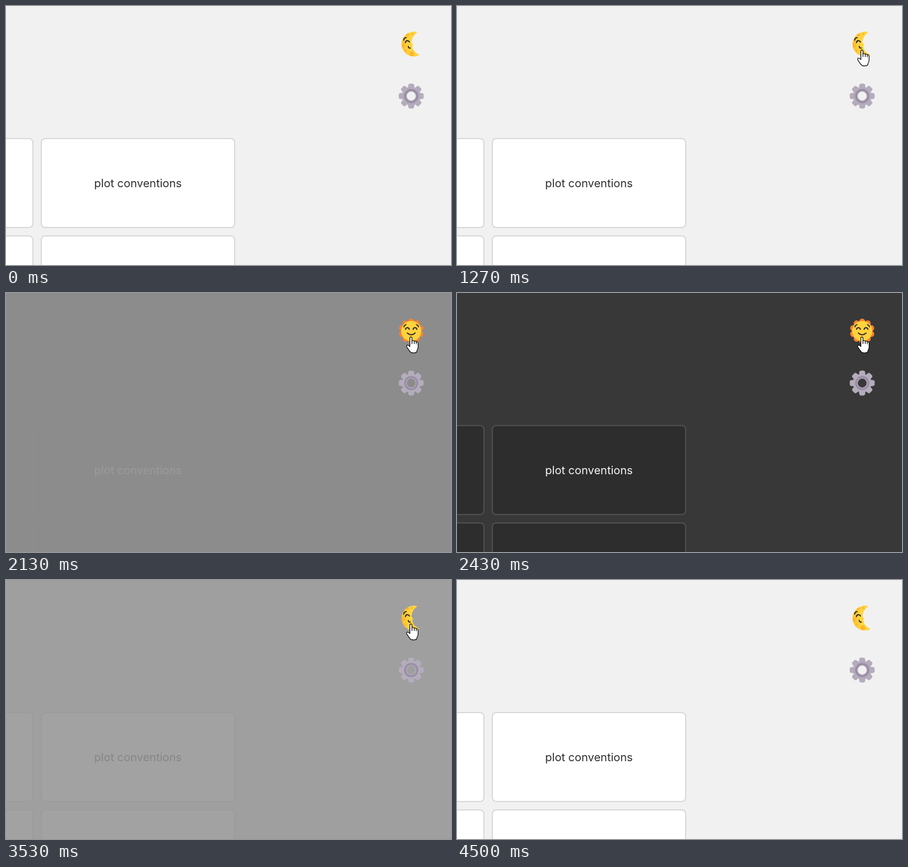
Recreate the animation shown at these times as an HTML page. Size 794 px wide and 463 px high, loop 5.83 s.

```html
<!DOCTYPE html>
<html lang="en">
<head>
<meta charset="utf-8">
<title>Theme toggle</title>
<style>
html, body { margin: 0; width: 100%; height: 100%; overflow: hidden; }
svg { display: block; width: 100vw; height: 100vh; }
text { font: 20px Inter, sans-serif; text-anchor: middle; }
.line { fill: none; stroke: #2b2433; stroke-width: 2; stroke-linecap: round; stroke-linejoin: round; }
</style>
</head>
<body>
<svg viewBox="0 0 794 463">
  <defs>
    <linearGradient id="glow" x1="0" x2="1">
      <stop offset="0" stop-color="#ffc22f"/>
      <stop offset=".5" stop-color="#fdd53f"/>
    </linearGradient>
    <clipPath id="crescent"><use href="#moonShape"/></clipPath>
  </defs>
  <rect id="page" width="794" height="463"/>
  <g id="cards" stroke-width="2">
    <rect x="-298" y="237" width="346" height="159" rx="7"/>
    <rect x="63" y="237" width="345" height="159" rx="7"/>
    <rect x="-298" y="411" width="346" height="159" rx="7"/>
    <rect x="63" y="411" width="345" height="159" rx="7"/>
  </g>
  <text id="label" x="235.5" y="324">plot conventions</text>

  <g id="moon">
    <path id="moonShape" fill="url(#glow)" d="M733 46.4C730 45.5 727 45.6 724 46.2C713 48.4 705.8 57.5 705.8 68C705.8 80.5 715.5 90.3 728 90.3C731.5 90.3 734.5 89.5 736.6 88.2C737.4 87.6 737 86.6 736 86.2C730 83.5 726 79 725.4 73.5L724.6 71.6Q727.2 70.2 725.7 68.2L723.6 65.5C723.8 58.5 727 52 732.8 48Q733.8 47 733 46.4Z"/>
    <g fill="#ffb52e" clip-path="url(#crescent)">
      <circle cx="724" cy="85.5" r="4.2"/>
      <circle cx="708" cy="71" r="3.8"/>
      <circle cx="716.5" cy="51.5" r="2.6"/>
      <circle cx="725" cy="50" r="2"/>
      <circle cx="713" cy="80" r="2"/>
    </g>
    <path class="line" d="M709.6 61Q710 57 714 56.6M712.6 65.5Q713.4 61.6 716.6 62Q719 62.2 719.8 64.4M717.8 72.2Q718 75.6 721.4 75.2"/>
  </g>

  <g id="sun" transform="translate(723 68)">
    <g id="rays" fill="#ff822d"><circle r="18.5"/></g>
    <circle r="18" fill="#ffd23c"/>
    <path class="line" d="M-13-7.5Q-12.4-10.6-9.4-11.4M13-7.5Q12.4-10.6 9.4-11.4M-10.2-3Q-9.6-6-6.8-6Q-4-6-3.4-3M10.2-3Q9.6-6 6.8-6Q4-6 3.4-3M-7 3.6Q0 10 7 3.6"/>
  </g>

  <g id="gear" transform="translate(723 161)" fill="#b4acbc">
    <circle r="12.2" fill="none" stroke="#b4acbc" stroke-width="8.6"/>
    <circle r="11" fill="none" stroke="#998ea4" stroke-width="3.4"/>
  </g>

  <g id="cursor" fill="#fff" stroke="#000" stroke-width="1.2" stroke-linejoin="round">
    <path id="arrow" d="M.6 .8V20L5 15.8L8 23L11.2 21.6L8.3 14.7H14.3Z"/>
    <g id="hand" transform="translate(-8 0)">
      <path d="M6.6 2.5a1.9 1.9 0 0 1 3.8 0V7.6Q13 6.2 14.4 8.1Q16.8 7.3 18 9.2Q21 8.8 21.3 11.8V19Q21.1 22 19.3 24.5V26.3Q18.3 29.1 13.2 29.2Q8.4 29.2 6.6 26.4L3.2 21.6L.9 18Q.4 15.5 2.4 15.2Q4 15.2 6.6 17.7Z"/>
      <path fill="none" d="M10.4 7.6V13M14.4 8.2V13M18 9.3V13.4"/>
    </g>
  </g>
</svg>
<script>
const LOOP = 5830;
const SVG_NS = 'http://www.w3.org/2000/svg';
const $ = id => document.getElementById(id);

// Grey levels: light theme, dark theme
const THEME = { page: [241, 56], card: [255, 45], border: [216, 80], text: [46, 245] };
const TO_DARK = { at: 1770, start: 1983, length: 465 };
const TO_LIGHT = { at: 3400, start: 3370, length: 500 };

// Each leg: start and end time, start and end point, easing
const LEGS = [
  { t: [200, 785], from: [30, 447], to: [607, 238], ease: u => 1 - (1 - u) ** 1.5 },
  { t: [785, 1270], from: [607, 238], to: [722, 78], ease: u => 1 - (1 - u) ** 1.8 },
  { t: [1270, 4240], from: [722, 78], to: [722, 78], ease: u => u },
  { t: [4240, 4500], from: [722, 78], to: [494, 466], ease: u => u ** 1.4 }
];

function add(parent, tag, attrs) {
  const el = document.createElementNS(SVG_NS, tag);
  for (const key in attrs) el.setAttribute(key, attrs[key]);
  parent.appendChild(el);
}

for (let i = 0; i < 10; i++)
  add($('rays'), 'circle', { cy: -17, r: 5.3, transform: `rotate(${i * 36})` });
for (let i = 0; i < 8; i++)
  add($('gear'), 'path', {
    d: 'M-5.8-14.5L-5.2-19.6Q-4.8-22.2-2.6-22.2H2.6Q4.8-22.2 5.2-19.6L5.8-14.5Z',
    transform: `rotate(${i * 45})`
  });

const clamp = x => Math.max(0, Math.min(1, x));
const mix = (a, b, u) => a + (b - a) * u;
const bezier = (a, b, s) => 3 * (1 - s) ** 2 * s * a + 3 * (1 - s) * s * s * b + s ** 3;

// CSS "ease" timing curve
function ease(x) {
  let lo = 0, hi = 1;
  for (let i = 0; i < 20; i++) {
    const mid = (lo + hi) / 2;
    if (bezier(.25, .25, mid) < x) lo = mid; else hi = mid;
  }
  return x <= 0 ? 0 : x >= 1 ? 1 : bezier(.1, 1, lo);
}

const fade = (t, f) => t < f.at ? 0 : ease(clamp((t - f.start) / f.length));
const show = (id, on) => $(id).setAttribute('visibility', on ? 'visible' : 'hidden');

function drawTheme(t) {
  const dark = fade(t, TO_DARK) - fade(t, TO_LIGHT);
  const grey = name => {
    const v = Math.round(mix(...THEME[name], dark));
    return `rgb(${v},${v},${v})`;
  };
  $('page').setAttribute('fill', grey('page'));
  $('cards').setAttribute('fill', grey('card'));
  $('cards').setAttribute('stroke', grey('border'));
  $('label').setAttribute('fill', grey('text'));
  const sunny = t >= TO_DARK.at && t < TO_LIGHT.at;
  show('sun', sunny);
  show('moon', !sunny);
}

function drawCursor(t) {
  const leg = LEGS.find(l => t >= l.t[0] && t < l.t[1]);
  let overIcon = false;
  if (leg) {
    const u = leg.ease((t - leg.t[0]) / (leg.t[1] - leg.t[0]));
    const [x, y] = leg.from.map((v, i) => mix(v, leg.to[i], u));
    overIcon = x > 698 && y < 95;
    $('cursor').setAttribute('transform', `translate(${x} ${y})`);
  }
  show('hand', leg && overIcon);
  show('arrow', leg && !overIcon);
}

function render(t) {
  drawTheme(t);
  drawCursor(t);
}

const begin = performance.now();
function tick() {
  render((performance.now() - begin) % LOOP);
  requestAnimationFrame(tick);
}
tick();
</script>
</body>
</html>
```
